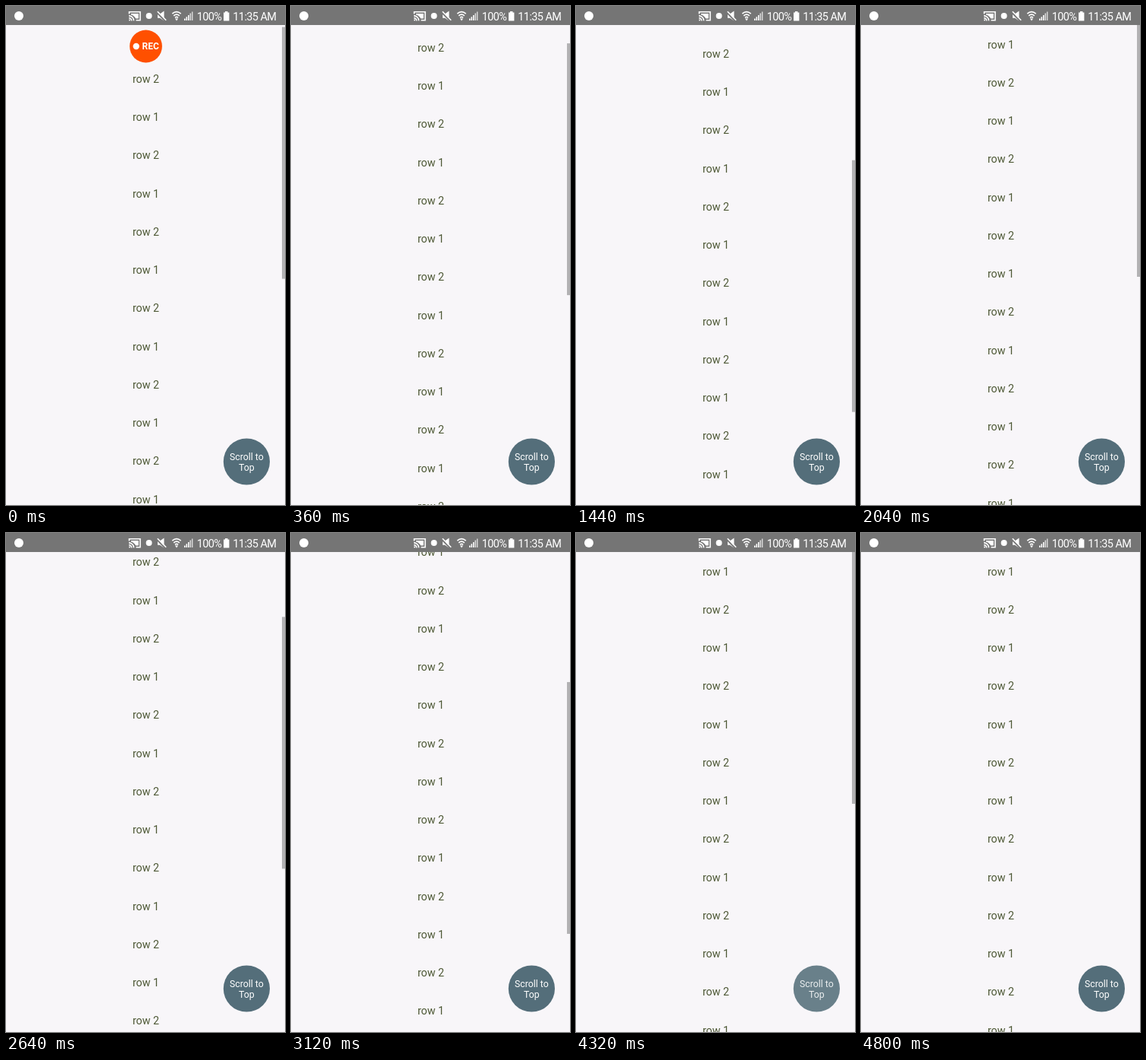
Animation of 368 by 656 pixels, one loop 5.28 s. Source, as an HTML page:

```html
<!DOCTYPE html>
<html lang="en">
<head>
<meta charset="utf-8">
<title>Scroll to top</title>
<style>
  html, body { margin: 0; width: 100%; height: 100%; overflow: hidden; background: #f8f6f9; }
  svg { display: block; width: 368px; height: 656px; font-family: Roboto, "Noto Sans", sans-serif; }
  #rows { fill: #4e5936; font-size: 14.3px; text-anchor: middle; }
  #top { fill: #fff; font-size: 12.3px; text-anchor: middle; }
  #rec { fill: #fff; font-size: 12px; font-weight: 700; }
  #status { fill: #fff; font-size: 14.5px; letter-spacing: -.6px; }
  .line { fill: none; stroke: #fff; stroke-width: 1.6; }
</style>
</head>
<body>
<svg viewBox="0 0 368 656">
  <rect width="368" height="656" fill="#f8f6f9"/>
  <g id="rows"></g>
  <rect id="bar" x="364" width="4" height="331" fill="#b2b1b3"/>

  <g id="top">
    <circle cx="317.4" cy="599" r="30.6" fill="#546e7a"/>
    <text x="317.3" y="597">Scroll to</text>
    <text x="317.3" y="611">Top</text>
  </g>

  <g id="rec">
    <circle cx="184.5" cy="53" r="21.4" fill="#ff5000"/>
    <circle cx="171.7" cy="53" r="4.2"/>
    <text x="179.6" y="57">REC</text>
  </g>

  <g id="status">
    <rect width="368" height="25" fill="#757575"/>
    <circle cx="17" cy="13" r="6"/>
    <!-- cast -->
    <path class="line" d="M162.5 10.5V7.7H177V18.8H171.5"/>
    <path d="M165 10H174.8V16.6H171.2Q169.5 12.8 165 11.4Z"/>
    <path class="line" d="M162 12.9A6.3 6.3 0 0 1 168.5 19.4M162 15.7A3.6 3.6 0 0 1 165.7 19.4"/>
    <circle cx="163" cy="18.6" r="1"/>
    <circle cx="188.6" cy="13" r="4"/>
    <!-- muted speaker -->
    <path d="M200 10.5H203L208.5 6.5V19.5L203 15.8H200Z"/>
    <path d="M199 8.5L210 19.8" stroke="#757575" stroke-width="2.2"/>
    <path class="line" d="M199.8 7.2L211.2 18.8"/>
    <!-- wireless -->
    <path class="line" d="M219.3 10.2Q225 5 230.7 10.2M221.2 12.8Q225 9.4 228.8 12.8M223 15.3Q225 13.6 227 15.3"/>
    <path d="M223 16.6H227L225 19.4Z"/>
    <!-- signal -->
    <path d="M235 16.5H236.6V19H235ZM237.5 14.3H239.1V19H237.5ZM240 12H241.6V19H240Z"/>
    <path d="M242.5 9.6H244.1V19H242.5ZM245 7.5H246.4V19H245Z" opacity=".75"/>
    <text x="251.7" y="19">100%</text>
    <path d="M289 7H292.4V8.4H294.4V19.4H287V8.4H289Z"/>
    <text x="299.3" y="19">11:35 AM</text>
  </g>
</svg>

<script>
const LOOP = 5280, STEP = 120, ROW = 50.25, COUNT = 24, VIEW = 631;
const el = id => document.getElementById(id);

const ramp = (t, start, length) => Math.min(1, Math.max(0, (t - start) / length));
const glide = (t, start, length) => (1 - Math.cos(Math.PI * ramp(t, start, length))) / 2;

// Two drags down the list, each followed by a quick return to the top
const scroll = t =>
  5 + 343 * glide(t, 0, 1600) - 348 * glide(t, 1720, 320) +
  335.2 * (glide(t, 2060, 1180) - glide(t, 3764, 320));

// Touch feedback: fade out on press, back in on release
const tap = (t, down, up) => ramp(t, down, 150) - ramp(t, up, 240);
const buttonAlpha = t => 1 - .8 * (tap(t, 1500, 1800) + tap(t, 3640, 4120));

// The bar fades some time after the list comes to rest
const barAlpha = t => 1 - ramp(t, 3540, 250) + ramp(t, 3790, 50) - ramp(t, 4480, 250);

for (let i = 0; i < COUNT; i++) {
  const row = document.createElementNS("http://www.w3.org/2000/svg", "text");
  row.setAttribute("x", 184.5);
  row.textContent = "row " + (i % 2 + 1);
  el("rows").append(row);
}

function draw(now) {
  const t = Math.floor(now % LOOP / STEP) * STEP;
  const y = scroll(t);
  [...el("rows").children].forEach((row, i) =>
    row.setAttribute("y", Math.floor(56.2 + i * ROW - y)));
  el("bar").setAttribute("y", 25 + y * VIEW / (COUNT * ROW));
  el("bar").setAttribute("opacity", barAlpha(t));
  el("top").setAttribute("fill-opacity", buttonAlpha(t));
  el("rec").setAttribute("visibility", t < STEP ? "visible" : "hidden");
}

const start = performance.now();
function tick() {
  draw(performance.now() - start);
  requestAnimationFrame(tick);
}
tick();
</script>
</body>
</html>
```
